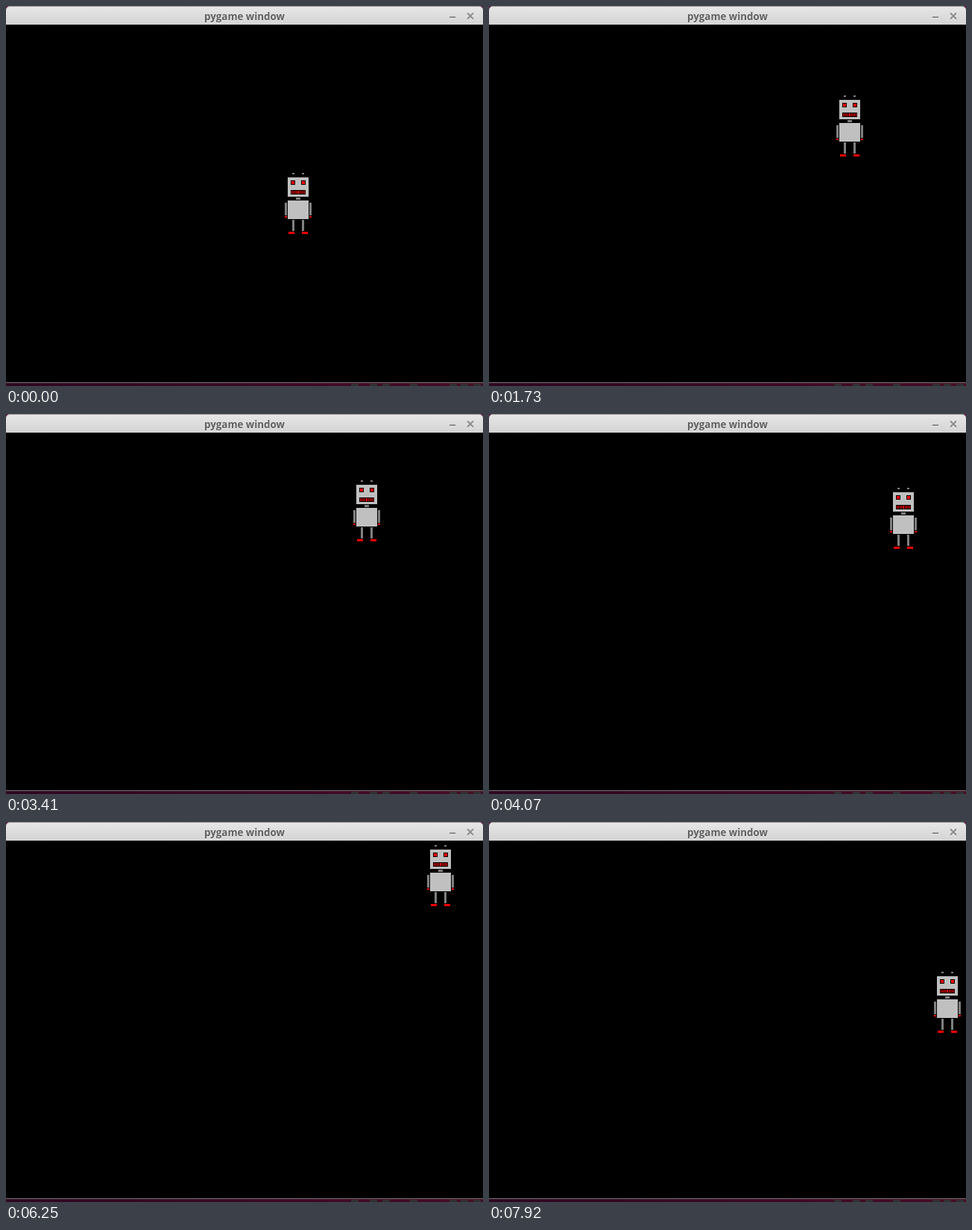
An HTML page with a canvas that plays this animation: 640 px wide and 510 px high, repeating every 8 s.

```html
<!DOCTYPE html>
<html lang="en">
<head>
<meta charset="utf-8">
<title>pygame window</title>
<style>
  html, body { margin: 0; width: 100%; height: 100%; overflow: hidden; background: #000; }
  canvas { display: block; }
</style>
</head>
<body>
<canvas id="stage" width="640" height="510"></canvas>
<script>
const ctx = document.getElementById('stage').getContext('2d', { alpha: false });
const LOOP = 8000, TICK = 46.58;

// Time and place of each turn and stop; the robot walks evenly in between.
const walk = [
  [0, 374, 224], [400, 374, 184], [1210, 466, 184], [2470, 466, 27],
  [2890, 466, 27], [3480, 466, 99], [4520, 597, 99],
  [4930, 597, 99], [5145, 565, 99], [5800, 565, 27],
  [6212, 565, 27], [7500, 565, 201], [7640, 565, 201], [7920, 597, 201], [LOOP, 597, 201]
];

function positionAt(time) {
  const i = walk.findIndex(([t]) => t > time);
  const [t0, x0, y0] = walk[i - 1], [t1, x1, y1] = walk[i];
  const k = (time - t0) / (t1 - t0);
  return [Math.round(x0 + (x1 - x0) * k), Math.round(y0 + (y1 - y0) * k)];
}

function rect(color, x, y, w, h) {
  ctx.fillStyle = color;
  ctx.fillRect(x, y, w, h);
}

function drawRobot(x, y) {
  const silver = '#c0c0c0', gray = '#808080', red = '#f00';
  ctx.save();
  ctx.translate(x, y);
  rect(silver, 4, 6, 28, 26);
  rect(gray, 15, 33, 6, 3);
  rect(silver, 4, 37, 28, 25);
  for (const side of [0, 1]) {
    const leg = 10 + 13 * side, eye = 8 + 14 * side, arm = 33 * side;
    rect(gray, leg, 0, 3, 2);
    rect('#000', eye, 10, 6, 6);
    rect(red, eye + 1, 11, 4, 4);
    rect(gray, arm, 40, 3, 17);
    rect(red, arm, 58, 3, 2);
    rect(gray, leg, 63, 3, 15);
    rect(red, 5 + 18 * side, 79, 8, 3);
  }
  // Teeth mirror each other around the middle of the mouth.
  rect('#000', 8, 23, 20, 6);
  for (let i = 0; i < 5; i++) {
    rect(red, 9 + 2 * i, 24, 1, 4);
    rect(red, 26 - 2 * i, 24, 1, 4);
  }
  ctx.restore();
}

function drawControls(color, dy) {
  rect(color, 595, 14 + dy, 8, 2);
  ctx.strokeStyle = color;
  ctx.lineWidth = 2;
  ctx.beginPath();
  ctx.moveTo(619, 9.5 + dy);
  ctx.lineTo(627, 17.5 + dy);
  ctx.moveTo(627, 9.5 + dy);
  ctx.lineTo(619, 17.5 + dy);
  ctx.stroke();
}

function roundedBar(fill, y, height) {
  ctx.fillStyle = fill;
  ctx.beginPath();
  ctx.roundRect(0, y, 640, height, [5, 5, 0, 0]);
  ctx.fill();
}

function drawWindow() {
  rect('#000', 0, 0, 640, 510);
  rect('#5a1440', 0, 0, 640, 8);

  const bar = ctx.createLinearGradient(0, 0, 0, 25);
  bar.addColorStop(0, '#e7e7e7');
  bar.addColorStop(1, '#d4d4d4');
  roundedBar('#999', 0, 25);
  roundedBar(bar, 1, 24);

  ctx.font = 'bold 10pt "Open Sans", "Noto Sans", sans-serif';
  ctx.textAlign = 'center';
  for (const [text, icon, dy] of [['#f0f0f0', '#eee', 1], ['#5f5f5f', '#8a8a8a', 0]]) {
    ctx.fillStyle = text;
    ctx.fillText('pygame window', 320, 19 + dy);
    drawControls(icon, dy);
  }

  const desk = ctx.createLinearGradient(0, 0, 640, 0);
  desk.addColorStop(0, '#2e0622');
  desk.addColorStop(1, '#480c26');
  rect(desk, 0, 506, 640, 4);
  rect('#777', 0, 505, 640, 1);
  for (const x of [463, 488, 505, 542, 595, 610, 627]) rect('#343034', x, 507, 10, 3);
}

function frame(now) {
  const time = now % LOOP;
  drawWindow();
  drawRobot(...positionAt(Math.floor(time / TICK) * TICK));
  requestAnimationFrame(frame);
}
requestAnimationFrame(frame);
</script>
</body>
</html>
```
